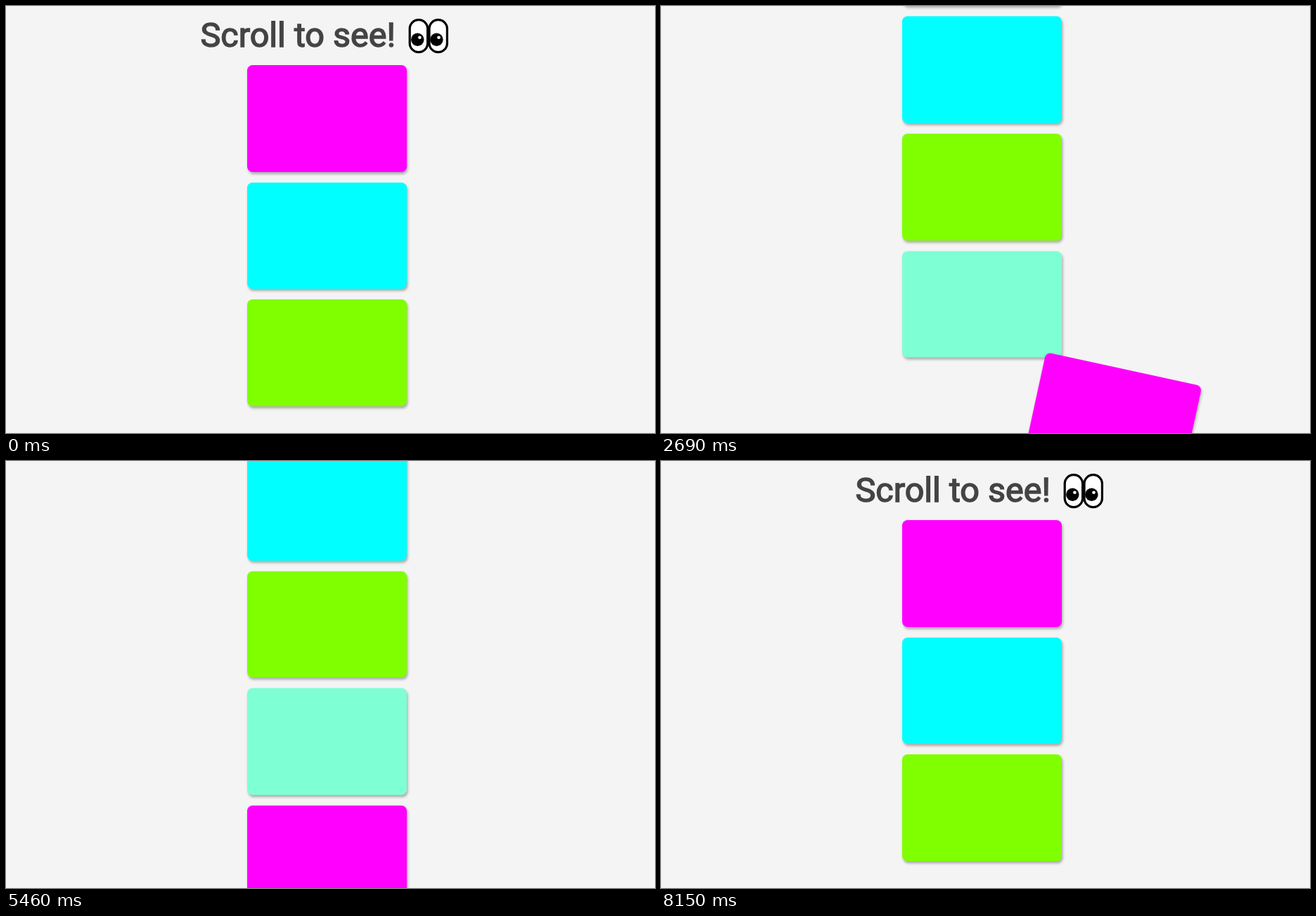
Animation of 923 by 607 pixels, one loop 8.61 s. Source, as an HTML page:

```html
<!DOCTYPE html>
<html lang="en">
<head>
<meta charset="utf-8">
<title>Scroll to see</title>
<style>
  html, body { margin: 0; width: 100%; height: 100%; overflow: hidden; background: #f4f4f4; }
  #stage { position: relative; width: 923px; height: 607px; overflow: hidden; }
  #page, #title { position: absolute; left: 0; top: 0; will-change: transform; }
  #title text {
    font: 400 48.5px Roboto, sans-serif;
    fill: #444; stroke: #444; stroke-width: 1.5px;
  }
  .box {
    position: absolute; left: 343px; width: 227.3px; height: 151.5px;
    border-radius: 7.6px;
    box-shadow: 1.5px 3px 3.8px rgba(0, 0, 0, .3);
  }
</style>
</head>
<body>
<div id="stage">
  <div id="page">
    <svg id="title" width="923" height="84">
      <text x="276.5" y="58">Scroll to see!</text>
      <g fill="#fff" stroke="#000" stroke-width="3.2">
        <rect x="574.2" y="19.7" width="25.4" height="46" rx="12.7"/>
        <rect x="602" y="19.7" width="25.4" height="46" rx="12.7"/>
      </g>
      <circle cx="585.3" cy="47.7" r="9.2"/>
      <circle cx="612.4" cy="47.7" r="9.2"/>
      <g fill="#fff">
        <circle cx="588.4" cy="44.8" r="2.3"/>
        <circle cx="615.5" cy="44.8" r="2.3"/>
      </g>
    </svg>
  </div>
</div>
<script>
const LOOP = 8610, STEP = LOOP / 112;
const COLORS = ['#f0f', '#0ff', '#7fff00', '#7fffd4'];
const COUNT = 13, FIRST_TOP = 84.1, PITCH = 166.67;
const ENTER_LINE = 546, LEAVE_LINE = 515;
const FLIGHT = 400, SHIFT = 909, TURN = 60;

// [time, scroll offset]
const DOWN = [[340, 0], [900, 205], [1384, 329.4], [2493, 871.4],
              [2690, 902.2], [3636, 1371.4], [4074, 1525], [4420, 1636]];
const UP = [[5400, 1636], [5919, 1263.4], [6919, 580.2], [8148, 0]];
const PATH = [...DOWN, ...UP];

// Piecewise linear lookup; from/to select the time or the offset column
function lookup(points, value, from, to) {
  const inside = (a, b) => (value - a[from]) * (value - b[from]) <= 0 && a[from] !== b[from];
  for (let i = 1; i < points.length; i++) {
    const a = points[i - 1], b = points[i];
    if (inside(a, b)) return a[to] + (b[to] - a[to]) * (value - a[from]) / (b[from] - a[from]);
  }
  return null;
}

const scrollAt = t => lookup(PATH, t, 0, 1) ??
  (t > DOWN.at(-1)[0] && t < UP[0][0] ? 1636 : 0);
const timeOf = (points, offset) => lookup(points, offset, 1, 0);

// CSS "ease": cubic-bezier(.25, .1, .25, 1)
function ease(x) {
  if (x <= 0) return 0;
  if (x >= 1) return 1;
  const curve = (u, p, q) => 3 * u * (1 - u) ** 2 * p + 3 * u * u * (1 - u) * q + u ** 3;
  let lo = 0, hi = 1;
  for (let i = 0; i < 24; i++) {
    const mid = (lo + hi) / 2;
    if (curve(mid, .25, .25) < x) lo = mid; else hi = mid;
  }
  return curve(lo, .1, 1);
}

const page = document.getElementById('page');
const boxes = Array.from({ length: COUNT }, (_, i) => {
  const el = document.createElement('div');
  const top = FIRST_TOP + i * PITCH;
  el.className = 'box';
  el.style.top = top + 'px';
  el.style.background = COLORS[i % 4];
  page.append(el);
  return {
    el,
    side: i % 2 ? -1 : 1,
    fixed: top < LEAVE_LINE,
    enter: timeOf(DOWN, top - ENTER_LINE),
    leave: timeOf(UP, top - LEAVE_LINE)
  };
});

function away(box, t) {
  if (box.fixed) return 0;
  return t < box.leave
    ? 1 - ease((t - box.enter) / FLIGHT)
    : ease((t - box.leave) / FLIGHT);
}

function draw(t) {
  page.style.transform = `translateY(${-scrollAt(t)}px)`;
  for (const box of boxes) {
    const k = away(box, t) * box.side;
    box.el.style.transform = k ? `translateX(${k * SHIFT}px) rotate(${k * TURN}deg)` : 'none';
  }
}

const start = performance.now();
function tick() {
  const t = (performance.now() - start) % LOOP;
  draw(Math.floor((t + 5) / STEP) * STEP);
  requestAnimationFrame(tick);
}
tick();
</script>
</body>
</html>
```
